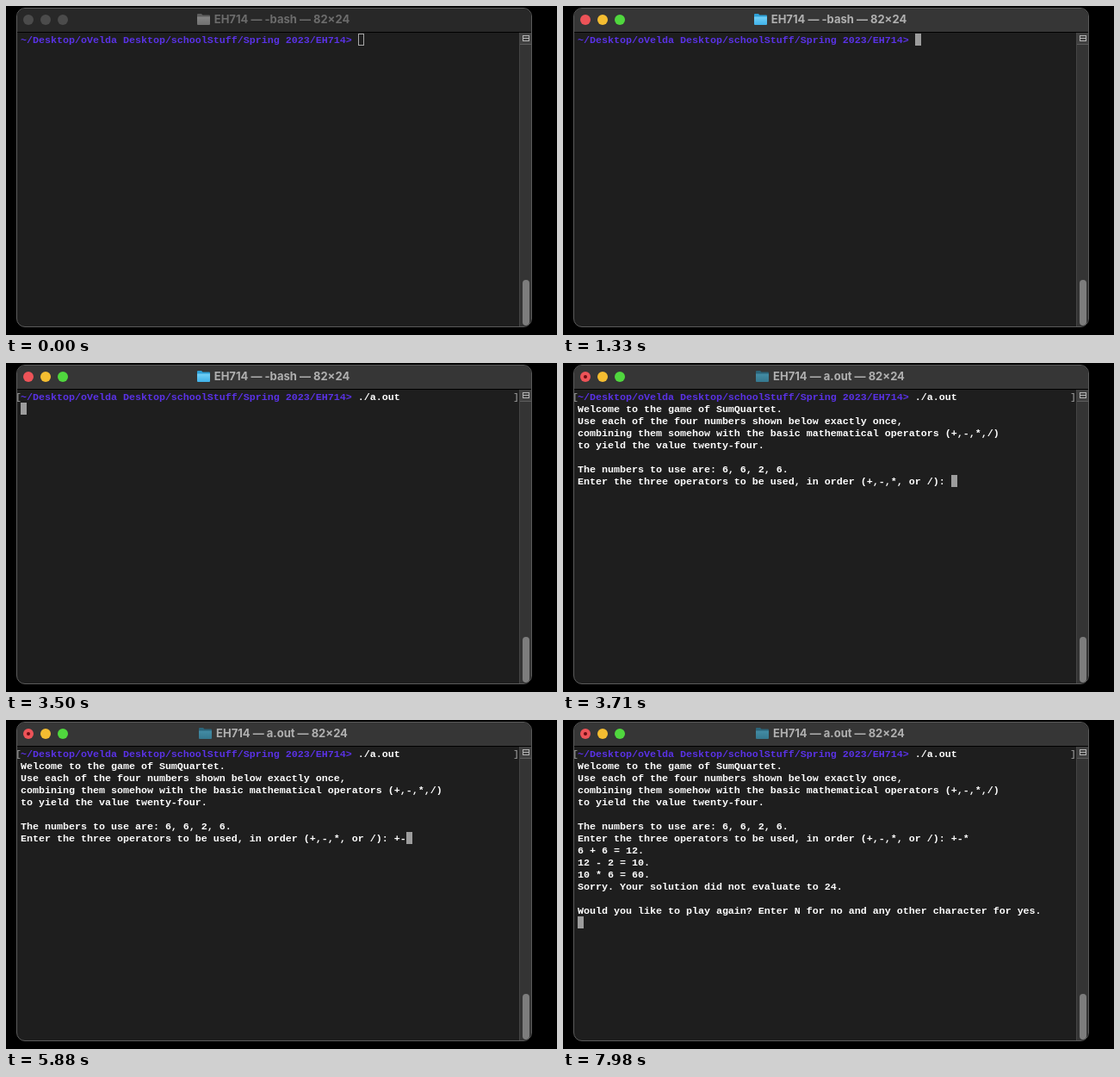
Recreate the animation shown at these times as an HTML page. Size 640x382 px, loop 8000 ms.

```html
<!DOCTYPE html>
<html lang="en">
<head>
<meta charset="utf-8">
<title>Terminal</title>
<style>
  html, body { margin: 0; width: 100%; height: 100%; overflow: hidden; background: #000; }
  *, ::before, ::after { box-sizing: border-box; }
  .stage { position: relative; width: 640px; height: 382px; overflow: hidden; background: #000; }
  .window {
    position: absolute; left: 12px; top: 2px; width: 599px; height: 371px;
    border: 1px solid #5b5b5b; border-radius: 10px; background: #1e1e1e; overflow: hidden;
    --bar: #363636; --title: #b0b0b0; --tab: #2d9fd6; --top: #73d0f7; --bottom: #3fb2e9;
  }
  .bar { height: 28px; background: var(--bar); border-bottom: 1px solid #000; }
  .light { position: absolute; top: 7px; width: 12px; height: 12px; border-radius: 50%; }
  .red { left: 7px; background: #ed5358; }
  .yellow { left: 27px; background: #f4bd31; }
  .green { left: 47px; background: #50d73e; }
  .red::after {
    content: ""; position: absolute; left: 4px; top: 4px; width: 4px; height: 4px;
    border-radius: 50%; background: #6b0c12; opacity: 0;
  }
  .title {
    position: absolute; left: 0; top: 0; width: 595px; height: 25px;
    display: flex; align-items: center; justify-content: center; gap: 5px;
    font: 700 13px/25px Inter, sans-serif; color: var(--title); white-space: pre;
  }
  .tab { fill: var(--tab); }
  .front { fill: url(#folder); }
  .idle { --bar: #282828; --title: #6c6c6c; --tab: #5d5d5d; --top: #858585; --bottom: #707070; }
  .idle .light { background: #4b4b4b; }
  .running { --tab: #2b6479; --top: #448ca5; --bottom: #35788f; }
  .running .red::after { opacity: 1; }

  .track {
    position: absolute; right: 0; top: 28px; width: 14px; bottom: 0;
    background: #343434; border-left: 1px solid #454545;
  }
  .split { position: absolute; left: 0; top: 0; width: 13px; height: 14px; background: #404040; border-bottom: 1px solid #5c5c5c; }
  .split::after {
    content: ""; position: absolute; left: 3px; top: 3px; width: 8px; height: 7px;
    border: 1px solid #b4b4b4; background: linear-gradient(#0000 2px, #b4b4b4 2px 3px, #0000 3px);
  }
  .thumb { position: absolute; left: 3px; bottom: 1px; width: 8px; height: 53px; border-radius: 4px; background: #7d7d7d; }

  .text, .mark { position: absolute; top: 33px; margin: 0; font: 700 11.667px/14px "Liberation Mono", monospace; white-space: pre; }
  .text { left: 17px; color: #fff; }
  .prompt { color: #5a32e6; }
  .mark { font-weight: 400; color: #a8a8a8; }
  .cursor { position: absolute; width: 7px; height: 14px; background: #9d9d9d; }
  .cursor.hollow { background: none; border: 1px solid #a8a8a8; }
</style>
</head>
<body>
<div class="stage">
  <div class="window" id="window">
    <div class="bar"></div>
    <div class="title">
      <svg width="15" height="13" viewBox="0 0 15 13">
        <linearGradient id="folder" x2="0" y2="1">
          <stop stop-color="var(--top)"/><stop offset="1" stop-color="var(--bottom)"/>
        </linearGradient>
        <path class="tab" d="M0 1Q0 0 1 0H5L6.5 1.5H14Q15 1.5 15 2.5V6H0Z"/>
        <path class="front" d="M0 3.5H15V12Q15 13 14 13H1Q0 13 0 12Z"/>
      </svg>
      <span id="title"></span>
    </div>
    <i class="light red"></i><i class="light yellow"></i><i class="light green"></i>
    <div class="track"><div class="split"></div><div class="thumb"></div></div>
  </div>
  <div class="cursor" id="cursor"></div>
  <pre class="text"><span class="prompt" id="prompt"></span><span id="output"></span></pre>
  <div class="mark" style="left:11px">[</div>
  <div class="mark" style="left:589px">]</div>
</div>
<script>
const LOOP = 8000, FOCUS = 1330, ENTER = 3500, RUNNING = 3640;
const FOLDER = 'EH714';
const PROMPT = `~/Desktop/oVelda Desktop/schoolStuff/Spring 2023/${FOLDER}> `;
const WELCOME = `Welcome to the game of SumQuartet.
Use each of the four numbers shown below exactly once,
combining them somehow with the basic mathematical operators (+,-,*,/)
to yield the value twenty-four.

The numbers to use are: 6, 6, 2, 6.
Enter the three operators to be used, in order (+,-,*, or /): `;
const RESULT = `
6 + 6 = 12.
12 - 2 = 10.
10 * 6 = 60.
Sorry. Your solution did not evaluate to 24.

Would you like to play again? Enter N for no and any other character for yes.
`;

// Text added to the terminal, with the time it appears
const additions = [
  [1610, '.'], [1960, '/'], [2380, 'a'],
  [2660, '.'], [2870, 'o'], [3010, 'u'], [3150, 't'],
  [ENTER, '\n'], [3570, WELCOME],
  [5530, '+'], [5880, '-'], [6440, '*'], [7140, RESULT]
];

const byId = id => document.getElementById(id);
const frame = byId('window'), title = byId('title'), output = byId('output'), cursor = byId('cursor');
const marks = document.querySelectorAll('.mark');
byId('prompt').textContent = PROMPT;

function render(t) {
  const typed = additions.filter(([time]) => time <= t).map(([, text]) => text).join('');
  const lines = (PROMPT + typed).split('\n');
  const running = t >= RUNNING;

  output.textContent = typed;
  title.textContent = `${FOLDER} — ${running ? 'a.out' : '-bash'} — 82×24`;
  frame.classList.toggle('idle', t < FOCUS);
  frame.classList.toggle('running', running);
  cursor.classList.toggle('hollow', t < FOCUS);
  cursor.style.left = 17 + 7 * lines.at(-1).length + 'px';
  cursor.style.top = 32 + 14 * (lines.length - 1) + 'px';
  for (const mark of marks) mark.hidden = t < ENTER;
}

function tick() {
  render(performance.now() % LOOP);
  requestAnimationFrame(tick);
}
tick();
</script>
</body>
</html>
```
